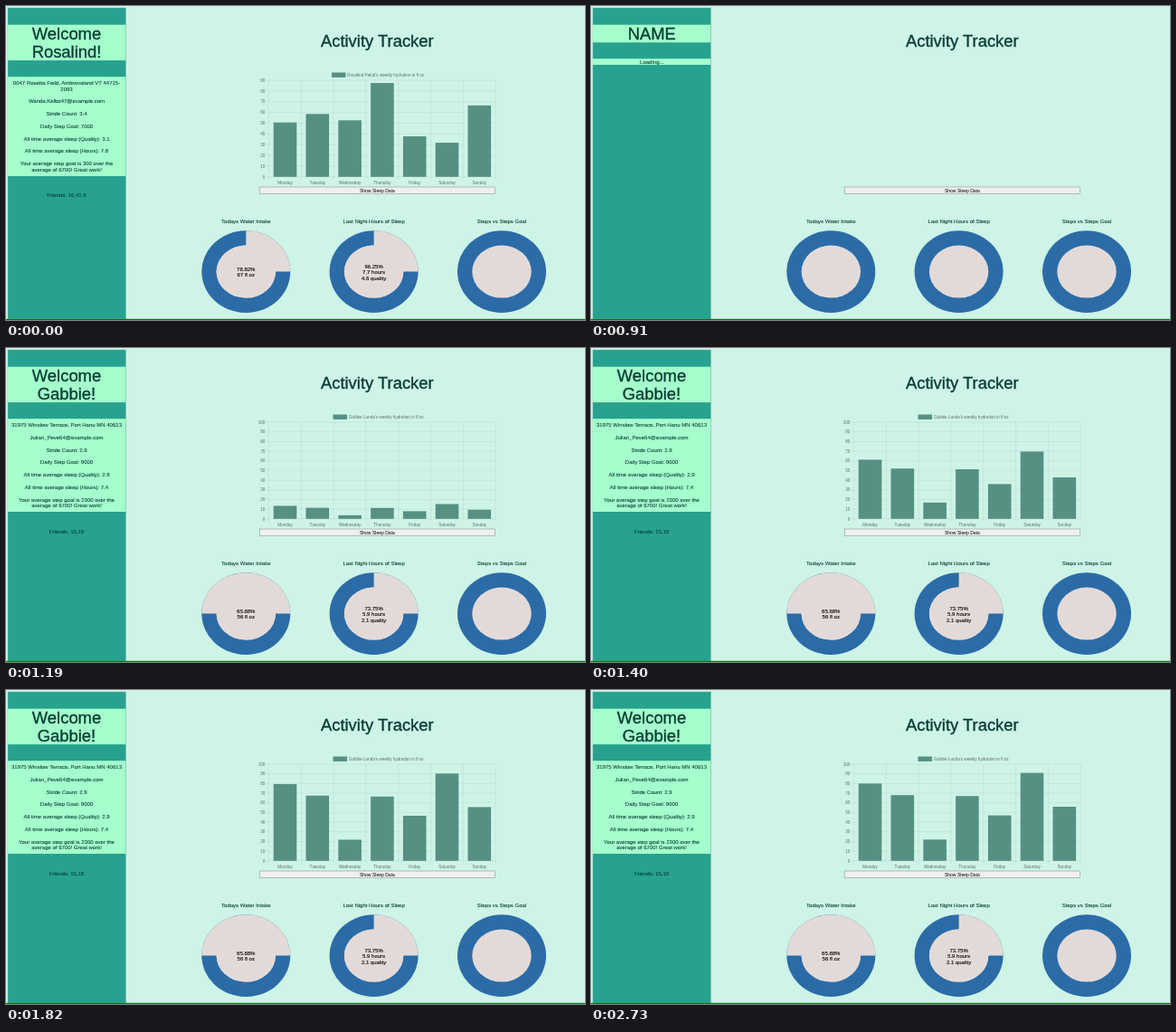
An HTML page for the animation above (2800 ms loop, 640 px wide and 347 px high).

```html
<!DOCTYPE html>
<html lang="en">
<head>
<meta charset="utf-8">
<title>Activity Tracker</title>
<style>
  html, body { margin: 0; width: 100%; height: 100%; overflow: hidden; background: #cef3e7; }
  svg { display: block; width: 640px; height: 347px; }
  text { font: 6px "Liberation Sans", Arial, sans-serif; text-anchor: middle; fill: #083c34; stroke: #083c34; stroke-width: .08px; }
  .big { font-size: 18.4px; stroke-width: .35px; }
  .stat { fill: #141414; stroke: #141414; stroke-width: .15px; }
  .tick { font-size: 4.65px; fill: #5f706b; stroke: none; }
  .right { text-anchor: end; }
  .left { text-anchor: start; }
  .button { font-size: 5.05px; fill: #000; stroke: none; }
  .mint { fill: #a4ffcc; }
  .bar { fill: #559083; }
  .grid { stroke: #000; stroke-opacity: .1; stroke-width: .5; fill: none; }
  .blue { fill: #2b6ca7; }
  .dial { fill: #e3dad8; }
</style>
</head>
<body>
<svg id="stage" viewBox="0 0 640 347" xmlns="http://www.w3.org/2000/svg"></svg>
<script>
const LOOP = 2800, STEP = 70, CLEAR = 910, LOADED = 1190;
const BASE = 188.8, HEIGHT = 106.8, LEFT = 290.6, SLOT = 35.8, BAR = 25.6;
const DAYS = ['Monday', 'Tuesday', 'Wednesday', 'Thursday', 'Friday', 'Saturday', 'Sunday'];
const DIALS = [265.3, 406.6, 548];
const RX = 49, RY = 45.3, CY = 293.6;

const users = [
  {
    first: 'Rosalind', last: 'Pelud', max: 90, legend: 360,
    week: [51, 59, 53, 88, 38, 32, 67],
    lines: [['0047 Rosetta Field, Ambrovaland VT 44715-', 87.2], ['2093', 93.6],
      ['Wanda.Kelbo47@example.com', 107.3], ['Stride Count: 3.4', 121],
      ['Daily Step Goal: 7000', 134.8], ['All time average sleep (Quality): 3.1', 148.5],
      ['All time average sleep (Hours): 7.8', 162.3], ['Your average step goal is 300 over the', 176],
      ['average of 6700! Great work!', 182.6], ['Friends: 16,41,9', 211.2]],
    end: 188, gaps: [1, 1],
    water: ['78.82%', '67 fl oz'], sleep: ['96.25%', '7.7 hours', '4.6 quality']
  },
  {
    first: 'Gabbie', last: 'Lunda', max: 100, legend: 361.5,
    week: [80, 68, 22, 67, 47, 91, 56],
    lines: [['31975 Winslow Terrace, Port Hanu MN 40613', 87.2],
      ['Julian_Peve64@example.com', 101], ['Stride Count: 2.9', 114.7],
      ['Daily Step Goal: 9000', 128.4], ['All time average sleep (Quality): 2.9', 142.2],
      ['All time average sleep (Hours): 7.4', 155.9], ['Your average step goal is 2300 over the', 169.6],
      ['average of 6700! Great work!', 176.2], ['Friends: 15,18', 204.7]],
    end: 181, gaps: [2, 1],
    water: ['65.88%', '56 fl oz'], sleep: ['73.75%', '5.9 hours', '2.1 quality']
  }
];

const text = (s, x, y, cls = '') => `<text class="${cls}" x="${x}" y="${y}">${s}</text>`;
const rect = (x, y, w, h, cls) => `<rect class="${cls}" x="${x}" y="${y}" width="${w}" height="${h}"/>`;
const ellipse = (x, inset, cls) =>
  `<ellipse class="${cls}" cx="${x}" cy="${CY}" rx="${RX - inset}" ry="${RY - inset}"/>`;

// Open quarters of a ring: 1 = top right, 2 = whole top half
function gap(x, quarters) {
  const from = quarters === 2 ? `${x - RX} ${CY}` : `${x} ${CY - RY}`;
  return `<path class="dial" d="M${x} ${CY}L${from}A${RX} ${RY} 0 0 1 ${x + RX} ${CY}Z"/>` + ellipse(x, 16.3, 'dial');
}

function chart(u) {
  const right = LEFT + SLOT * 7;
  let path = '', out = '';
  for (let v = 0; v <= u.max; v += 10) {
    const y = BASE - v / u.max * HEIGHT;
    path += `M${LEFT - 3} ${y}H${right}`;
    out += text(v, LEFT - 4.2, y + 1.7, 'tick right');
  }
  for (let i = 0; i <= 7; i++) path += `M${LEFT + i * SLOT} ${BASE - HEIGHT}V${BASE + 3}`;
  out += `<path class="grid" d="${path}"/>`;
  DAYS.forEach((day, i) => {
    const mid = LEFT + (i + .5) * SLOT;
    out += text(day, mid, 197.3, 'tick') + rect(mid - BAR / 2, BASE, BAR, 0, 'bar day');
  });
  return out + rect(u.legend, 73.5, 15.5, 5.4, 'bar') +
    text(`${u.first} ${u.last}'s weekly hydration in fl oz`, u.legend + 17.2, 77.9, 'tick left');
}

function page(u) {
  return `<g class="page">` +
    rect(2, 20.7, 130.3, 39.4, 'mint') + rect(2, 78.2, 130.3, u.end - 78.2, 'mint') +
    text('Welcome', 67, 37, 'big') + text(u.first + '!', 67, 56.6, 'big') +
    u.lines.map(([s, y]) => text(s, 67, y)).join('') + chart(u) +
    u.gaps.map((n, i) => gap(DIALS[i], n)).join('') +
    u.water.map((s, i) => text(s, DIALS[0], 292.6 + i * 6.8, 'stat')).join('') +
    u.sleep.map((s, i) => text(s, DIALS[1], 289.6 + i * 6.8, 'stat')).join('') + '</g>';
}

const blank = '<g class="page">' + rect(2, 20.7, 130.3, 19.6, 'mint') + rect(2, 58.2, 130.3, 6.8, 'mint') +
  text('NAME', 67.3, 37, 'big') + text('Loading...', 67.3, 63.6) + '</g>';

const shared = '<rect x="2" y="2" width="130.5" height="344" fill="#26a28e" stroke="#8fb5ab" stroke-width=".5"/>' +
  text('Activity Tracker', 410.3, 44.6, 'big') +
  '<rect x="280.2" y="200" width="260.4" height="7.3" fill="#efefef" stroke="#858585" stroke-width=".5"/>' +
  text('Show Sleep Data', 410.4, 205.5, 'button') +
  ['Todays Water Intake', 'Last Night Hours of Sleep', 'Steps vs Steps Goal'].map((s, i) =>
    text(s, DIALS[i], 239.5) + ellipse(DIALS[i], 0, 'blue') + ellipse(DIALS[i], 16.3, 'dial')).join('');

const stage = document.getElementById('stage');
stage.innerHTML = shared + page(users[0]) + blank + page(users[1]) +
  '<rect y="345.8" width="640" height="1.2" fill="#0b7518"/>';
const pages = [...stage.querySelectorAll('.page')];
const bars = [0, 2].map(i => [...pages[i].querySelectorAll('.day')]);

const easeOutQuart = p => 1 - (1 - Math.min(1, p)) ** 4;

// Chart progress after loading, through a few measured points
const PROGRESS = [[1190, .045], [1400, .304], [1820, .71], [2100, 1], [LOOP, 1]];
function progress(t) {
  const i = PROGRESS.findIndex(([end], n) => n && t <= end);
  const [t0, p0] = PROGRESS[i - 1], [t1, p1] = PROGRESS[i];
  return p0 + (p1 - p0) * (t - t0) / (t1 - t0);
}

function grow(n, k) {
  const u = users[n];
  bars[n].forEach((bar, i) => {
    const h = u.week[i] / u.max * HEIGHT * k;
    bar.setAttribute('y', BASE - h);
    bar.setAttribute('height', h);
  });
}

function draw(now) {
  const t = Math.floor(now % LOOP / STEP) * STEP;
  const shown = t < CLEAR ? 0 : t < LOADED ? 1 : 2;
  pages.forEach((g, i) => g.setAttribute('visibility', i === shown ? 'visible' : 'hidden'));
  if (shown === 0) grow(0, easeOutQuart(.71 + t / 1000));
  if (shown === 2) grow(1, easeOutQuart(progress(t)));
}

const start = performance.now();
function tick() {
  draw(performance.now() - start);
  requestAnimationFrame(tick);
}
tick();
</script>
</body>
</html>
```
